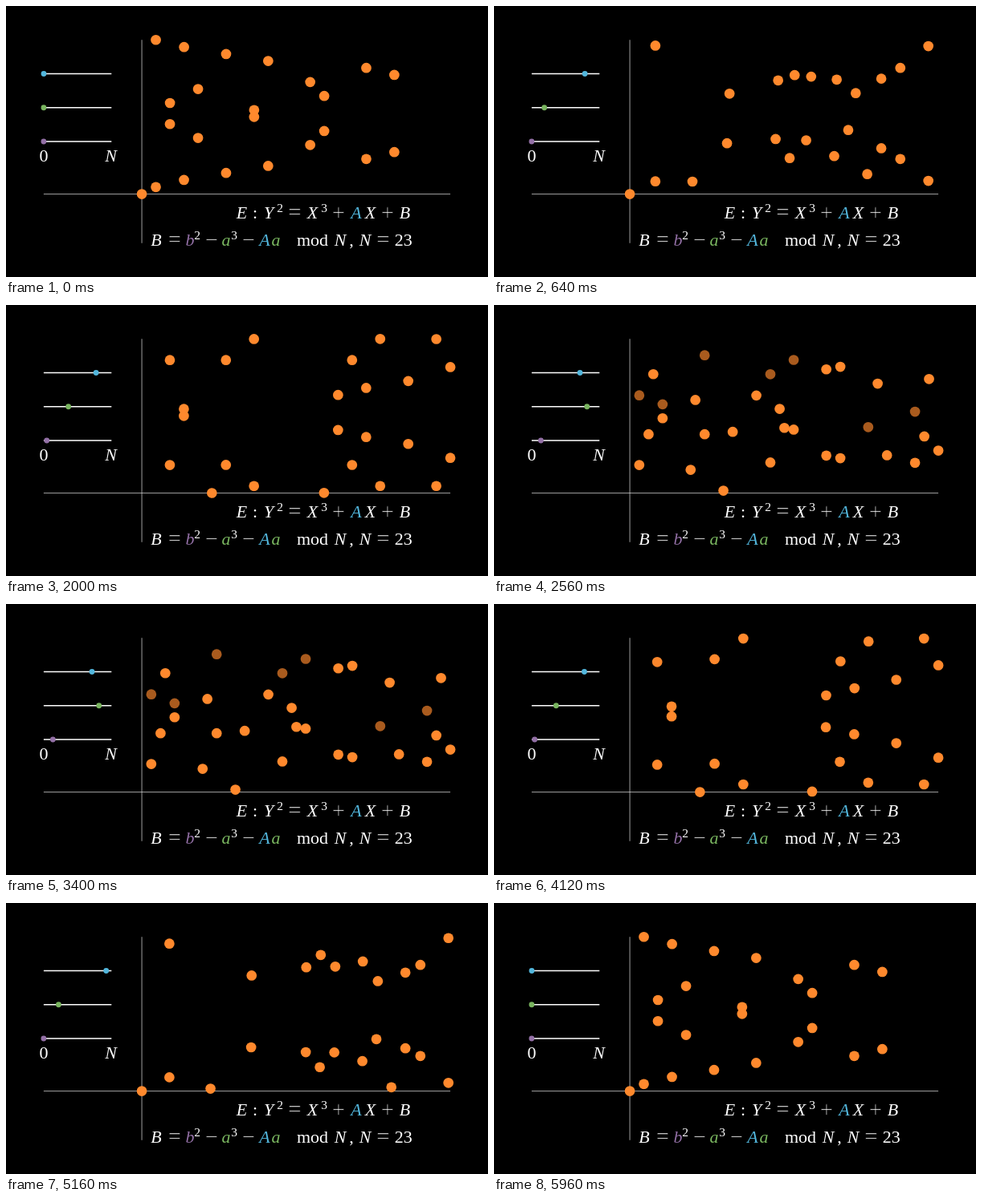
An HTML page that plays this animation: 600x338 px, repeating every 6000 ms.

```html
<!DOCTYPE html>
<html lang="en">
<head>
<meta charset="utf-8">
<title>Elliptic curve modulo N</title>
<style>
  html, body { margin: 0; width: 100%; height: 100%; overflow: hidden; background: #000; }
  svg { display: block; width: 100%; height: 100%; }
  text { font: 22px "Liberation Serif", "Times New Roman", serif; fill: #fff; text-anchor: middle; }
  .var { font-style: italic; }
  .up { font-style: normal; }
  /* The black outline thins the operator strokes */
  .op { font-size: 29px; stroke: #000; stroke-width: .6; }
  .sup { font-size: 15.5px; }
  .word { text-anchor: start; }
  .A { fill: #52b6dc; }
  .a { fill: #79b55f; }
  .b { fill: #9370a6; }
  #axes { stroke: #d8d8d8; stroke-width: .74; }
  #tracks { stroke: #fff; stroke-width: 1.5; }
  #dots { fill: #ff892d; }
</style>
</head>
<body>
<svg viewBox="0 0 600 338">
  <path id="axes" d="M46.9 234.56H553.1M169.07 42.25V295.75"/>
  <path id="tracks" d="M46.9 84.5h84.4M46.9 126.75h84.4M46.9 169h84.4"/>
  <g id="knobs">
    <circle class="A" cy="84.5" r="3.4"/>
    <circle class="a" cy="126.75" r="3.4"/>
    <circle class="b" cy="169" r="3.4"/>
  </g>
  <text x="47" y="194">0</text>
  <text class="var" x="130.5" y="194">N</text>

  <text class="var" x="293.5 310 327 381.5 436 453.5 496.5" y="264.7">E<tspan class="up">:</tspan>YX<tspan class="A">A</tspan>XB</text>
  <text class="sup" x="341 396" y="256.7">23</text>
  <text class="op" x="359.5 414 475" y="266.5">=++</text>

  <text class="var" x="187 229 274 322 336 416 430 447" y="299.4">B<tspan class="b">b</tspan><tspan class="a">a</tspan><tspan class="A">A</tspan><tspan class="a">a</tspan>N<tspan class="up">,</tspan>N</text>
  <text class="sup" x="238 284" y="290.6">23</text>
  <text class="op" x="210 256 302 469.5" y="301.2">=−−=</text>
  <text class="word" x="362" y="299.4">mod</text>
  <text class="word" x="483.7" y="299.4">23</text>
  <g id="dots"></g>
</svg>
<script>
const N = 23, STEP = 40, FRAMES = 150;

// Slider values A, a, b at each stop
const stops = [[0, 0, 0], [21, 5, 0], [17, 8, 1], [15, 23, 4]];

const mod = v => ((v % N) + N) % N;
const lerp = (p, q, t) => p + (q - p) * t;
const sigmoid = v => 1 / (1 + Math.exp(-v));
const smooth = s => (sigmoid(10 * (s - .5)) - sigmoid(-5)) / (1 - 2 * sigmoid(-5));

function curvePoints([A, a, b]) {
  const B = b * b - a ** 3 - A * a, points = [];
  for (let x = 0; x < N; x++)
    for (let y = 0; y < N; y++)
      if (mod(y * y - x ** 3 - A * x - B) === 0) points.push([x, y]);
  return points;
}

// Pair the points of two curves; extra ones split off a neighbour and fade in
function pairUp(from, to) {
  const source = j => Math.floor(j * from.length / to.length);
  return to.map((q, j) => ({
    p: from[source(j)], q, fade: j > 0 && source(j) === source(j - 1)
  }));
}

const curves = stops.map(curvePoints);
const moves = curves.slice(1).map((c, i) => pairUp(curves[i], c));
const knobs = [...document.querySelectorAll('#knobs circle')];
const group = document.getElementById('dots');
const dots = Array.from({ length: Math.max(...curves.map(c => c.length)) }, () => {
  const dot = document.createElementNS('http://www.w3.org/2000/svg', 'circle');
  dot.setAttribute('r', 6.35);
  return group.appendChild(dot);
});

function draw(ms) {
  const k = Math.floor(ms / STEP) % FRAMES;
  // There and back, sampled from sixty ticks per move
  const tick = 1 + Math.floor(12 * Math.min(k, FRAMES - 1 - k) / 5);
  const leg = Math.floor(tick / 60);
  const t = smooth(tick % 60 / 60);

  knobs.forEach((knob, i) => {
    const value = lerp(stops[leg][i], stops[leg + 1][i], t);
    knob.setAttribute('cx', 46.9 + 84.4 * value / 22);
  });
  dots.forEach((dot, j) => {
    const m = moves[leg][j];
    dot.setAttribute('opacity', !m ? 0 : m.fade ? t : 1);
    if (!m) return;
    dot.setAttribute('cx', 169.07 + 17.457 * lerp(m.p[0], m.q[0], t));
    dot.setAttribute('cy', 234.56 - 8.741 * lerp(m.p[1], m.q[1], t));
  });
}

const start = performance.now();
function loop() {
  draw(performance.now() - start);
  requestAnimationFrame(loop);
}
loop();
</script>
</body>
</html>
```
